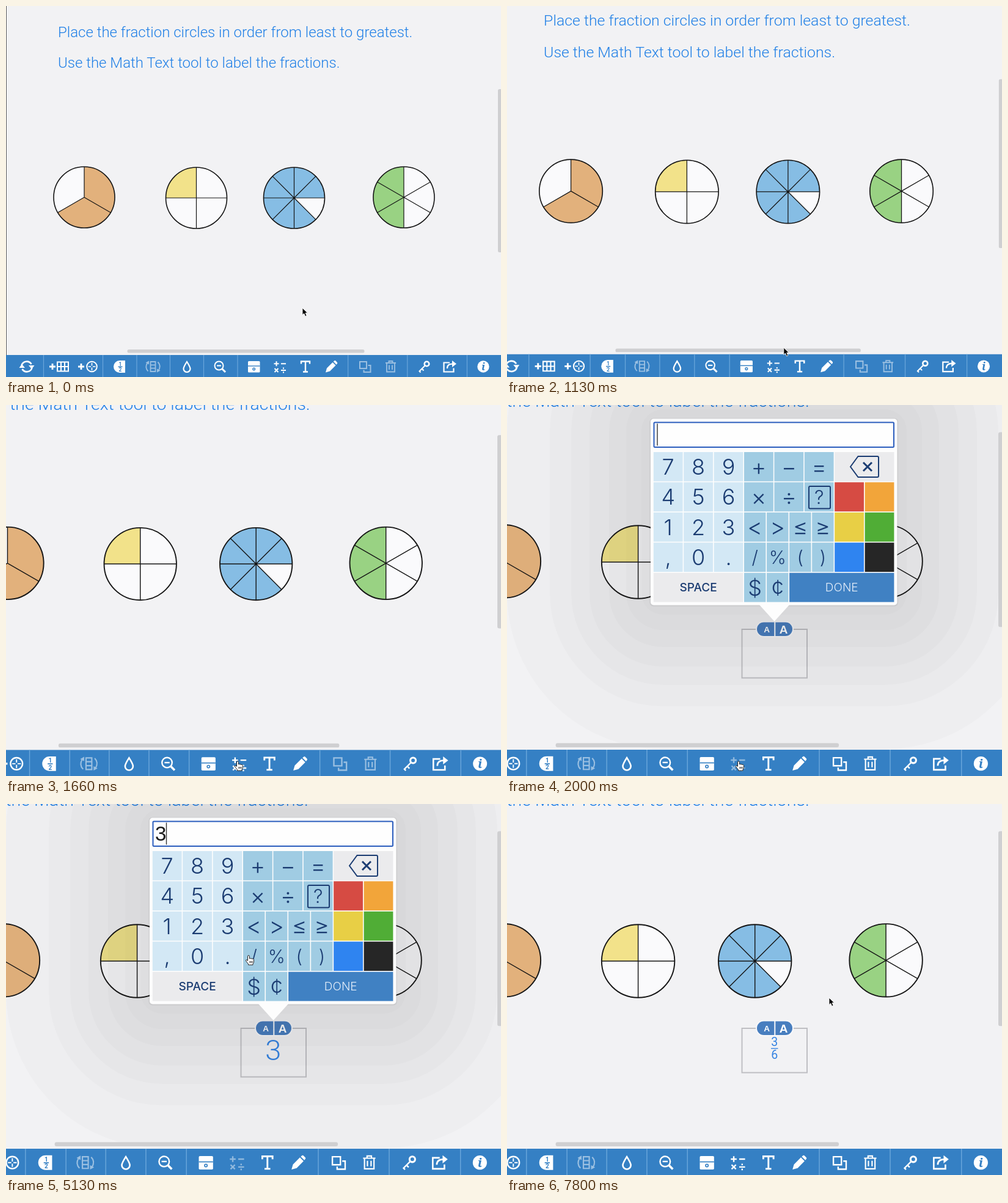
Recreate the animation shown at these times as an HTML page. Size 810 px wide and 607 px high, loop 9400 ms.

```html
<!DOCTYPE html>
<html lang="en">
<head>
<meta charset="utf-8">
<title>Ordering fractions</title>
<style>
  html, body { margin: 0; width: 100%; height: 100%; overflow: hidden; background: #f2f2f4; }
  svg { display: block; width: 100%; height: 100%; cursor: default; }
  .task { font: 300 24px Roboto, sans-serif; fill: #1f7fe6; }
  #bar { fill: none; stroke: #fff; stroke-width: 2; }
  #bar .solid { fill: #fff; stroke: none; }
  #bar .blue { fill: #3580c4; stroke: none; }
  #bar .cut { stroke: #3580c4; stroke-width: 1.4; }
  #bar .dim { opacity: .5; }
  #keys text { font-family: Inter, "Liberation Sans", sans-serif; font-weight: 300; fill: #1b3c72; text-anchor: middle; }
  #keys .word { font-weight: 500; }
  #keys .done { font-weight: 300; fill: #e4eefa; }
  #entry { font: 33px "Liberation Sans", sans-serif; fill: #1c1c1c; }
  #label text { font-family: Roboto, sans-serif; fill: #3583e2; text-anchor: middle; }
  #label .size { font-family: "Liberation Sans", sans-serif; font-weight: bold; fill: #fff; }
</style>
</head>
<body>
<svg viewBox="0 0 810 607">
  <g id="page">
    <rect width="810" height="607" fill="#f2f2f4"/>
    <path d="M.5 0V571" stroke="#5a5a5c"/>
    <text class="task" x="85" y="51">Place the fraction circles in order from least to greatest.</text>
    <text class="task" x="85" y="101">Use the Math Text tool to label the fractions.</text>
    <g id="pies"></g>
  </g>

  <g id="label">
    <rect id="frame" x="384.5" y="367" width="106.5" height="79.5" fill="none" stroke="#bfbfc3" stroke-width="2"/>
    <rect x="407" y="353.5" width="62" height="26.5" rx="13.2" fill="#f8f8fa"/>
    <rect x="409" y="355.5" width="58" height="22.5" rx="11.2" fill="#487ebf"/>
    <path d="M438.3 355v23.5" stroke="#f8f8fa" stroke-width="2"/>
    <text class="size" x="425" y="372" font-size="13.5">A</text>
    <text class="size" x="452.5" y="374" font-size="19">A</text>
    <text id="whole" x="437.2" y="419" font-size="47" font-weight="300">3</text>
    <g id="fraction">
      <text x="437.7" y="396.3" font-size="19.5">3</text>
      <path d="M432 400h11.5" stroke="#3583e2" stroke-width="1.4"/>
      <text id="lower" x="437.7" y="416.6" font-size="19.5">6</text>
    </g>
  </g>

  <g id="popup">
    <g id="shade" fill-opacity=".017"></g>
    <rect x="233.5" y="21.5" width="406.5" height="308" rx="6" fill-opacity=".06"/>
    <path d="M413 327h49l-24.5 27z" fill="#fdfdfd"/>
    <rect x="235" y="22.5" width="403.5" height="305" rx="5" fill="#fdfdfd"/>
    <rect x="240.5" y="28.5" width="392.5" height="40.5" rx="1.5" fill="#fefefe" stroke="#2b5dbd" stroke-width="2"/>
    <text id="entry" x="244" y="60"></text>
    <path id="caret" d="M0 30.5v36" stroke="#333" stroke-width="1.4"/>
    <g id="keys"></g>
    <g fill="none" stroke="#1b3c72" stroke-width="2">
      <path d="M562 101l12.5-17H606q2 0 2 2v30q0 2-2 2H574.5z"/>
      <path d="M583 94l14 14m0-14l-14 14" stroke-width="3"/>
      <rect x="494" y="133" width="35" height="36.5" rx="2"/>
    </g>
  </g>

  <g id="chrome">
    <g fill="#cfcfd1">
      <rect x="198.5" y="562" width="388" height="5.6" rx="2.5"/>
      <rect x="805" y="136" width="9" height="267" rx="2.5"/>
    </g>
    <g id="bar" transform="translate(0 590)">
      <rect class="blue" y="-19" width="811" height="37"/>
      <path stroke="#6aa6db" stroke-width="1.2" d="M61.5-19v36M158.5-19v36M214-19v36M268.5-19v36M323.5-19v36M379-19v36M559.7-19v36M656.8-19v36M754.5-19v36"/>
      <g id="turn">
        <path stroke-width="2.6" d="M25.5-2A8.8 8.8 0 0 1 41.5-4"/>
        <path class="solid" d="M37-2h9.5l-4.5 6z"/>
      </g>
      <use href="#turn" transform="rotate(180 34 0)"/>
      <path stroke-width="2.8" d="M71 0h10M76-5v10M118 0h10M123-5v10"/>
      <path d="M84-7.5h18v15h-18zM90-7v14M96-7v14M84 0h18"/>
      <circle cx="140.5" r="8.3"/>
      <path stroke-width="1.6" d="M134.5 0h4.5m3 0h4.5M140.5-6v4.5m0 3V6"/>
      <path class="solid" d="M195-10h-9a10 10 0 0 0 0 20h9z"/>
      <g class="blue" font-family="Roboto, sans-serif" font-size="8.5" font-weight="bold" text-anchor="middle">
        <text x="187" y="-1.5">1</text>
        <text x="187" y="8.2">2</text>
      </g>
      <path class="cut" d="M183.5 .2h7"/>
      <g class="dim">
        <path stroke-width="1.8" d="M236.5-8h8v16h-8zM236.5-2.7h8m-8 5.4h8M232.5 7.5c-4-4-4-9-1-14M248.5-7.5c4 4 4 9 1 14"/>
        <path class="solid" d="M228.5-6.5l5.5-3v6zM252.5 6.5l-5.5 3v-6z"/>
      </g>
      <path stroke-width="2.2" d="M296-8C292.5-2.5 290.5 1 290.5 3.5a5.5 5.5 0 0 0 11 0C301.5 1 299.500-2.500 296-8z"/>
      <circle cx="348.5" cy="-1.5" r="7"/>
      <path d="M345-1.5h7"/>
      <path stroke-width="3" d="M353.5 3.5l5.5 5.5"/>
      <rect class="solid" x="396" y="-9" width="19.5" height="18.5" rx="1.5"/>
      <path class="cut" d="M396-1h19.5"/>
      <circle class="cut" cx="405.7" cy="4" r="1.8"/>
      <path id="math" d="M438.5-4.8h8M442.5-8.8v8M450-4.800h8M439.5 3l6 6m0-6l-6 6M450 6h8M454 1.5v2.2m0 4.6v2.2"/>
      <path stroke-width="2.4" d="M483-4.5v-4h14v4M490-8.5v17M486 8.5h8"/>
      <path class="solid" d="M523 9.5l2-7L534.5-7l5 5-9.5 9.5zM535.7-8.2l1.8-1.5q1-.6 2 .3l2.3 2.3q.9 1 .3 2l-1.5 1.8z"/>
      <g id="edit">
        <path d="M579-8h11v11h-11zM592.5-2h4v11h-11V5.5"/>
        <path stroke-width="1.8" d="M621-6h17M626.5-6.5v-2.5h6v2.500M623-6V8.5h13V-6M627-2.5v7.5M632-2.5v7.5"/>
      </g>
      <circle cx="688.5" cy="-4.5" r="3.8" stroke-width="2.6"/>
      <path d="M686-2l-9.5 9.5 2 2M680.5 3.5l3 3"/>
      <path stroke-width="2.2" d="M726-6.5h-9.5v15h16v-6M722 3c0-6 4-7.5 9-7.5"/>
      <path class="solid" d="M730-10l7 5.5-7 5.5z"/>
      <circle class="solid" cx="781" r="9.7"/>
      <text class="blue" x="781" y="6" font-family="Noto Serif, serif" font-size="17" font-style="italic" font-weight="bold" text-anchor="middle">i</text>
    </g>
  </g>

  <g id="mouse" stroke-linejoin="round">
    <path id="arrow" d="M0 0V11.500l2.7-2.4 2 4.6 2.3-1-2-4.5H8.6z" stroke="#fff" stroke-width=".9"/>
    <path id="hand" fill="#fff" stroke="#222" d="M-1.5 1.2q0-1.4 1.4-1.4T1.4 1.2V5q1.3-1 2.4 0 1.3-.6 2.3.4 1.7-.5 2.3 1V10q0 2-1.4 3.5v1.7H-.5v-1.5Q-2.5 11.5-4.5 8.5q-.3-1.6 1.3-1.6l1.7 1.5zM2 9v3m2-3v3m2-3v3"/>
  </g>
</svg>

<script>
const LOOP = 9400, ZOOM = 1.1944;
const $ = id => document.getElementById(id);
const add = (id, markup) => $(id).insertAdjacentHTML('beforeend', markup);

function pie(x, y, parts, start, filled, color) {
  const r = 50;
  const rim = i => {
    const a = (start + i * 360 / parts) * Math.PI / 180;
    return `${r * Math.cos(a)} ${r * Math.sin(a)}`;
  };
  let spokes = '';
  for (let i = 0; i < parts; i++) spokes += `M0 0L${rim(i)}`;
  const large = filled * 2 > parts ? 1 : 0;
  add('pies', `<g transform="translate(${x} ${y})" stroke="#151515">
    <circle r="${r}" fill="#fafafc" stroke="none"/>
    <path d="M0 0L${rim(0)}A${r} ${r} 0 ${large} 1 ${rim(filled)}z" fill="${color}" stroke="none"/>
    <path d="${spokes}" stroke-width="1.2"/>
    <circle r="${r}" fill="none" stroke-width="1.6"/></g>`);
}
pie(128, 313, 3, -90, 2, '#e2b17c');
pie(311.5, 314, 4, 180, 1, '#f2e28a');
pie(471.5, 314, 8, 45, 7, '#86bde4');
pie(651, 313, 6, 90, 3, '#99d283');

// Stepped shadow: each band reaches d px beyond the popup
for (const d of [235, 165, 130, 100, 68, 40, 15])
  add('shade', `<rect x="${235 - d}" y="${22 - d}" width="${404 + 2 * d}" height="${306 + 2 * d}" rx="${d + 20}"/>`);

// Keypad: col and span count in cells of 49.4 px
const CELL = 49.4, GAP = 1.6, PALE = '#d3e8f5', MID = '#a0cce3', GREY = '#ebebed';
function key(col, row, span, bg, text = '', size = 36, cls = '') {
  const x = 239.8 + col * CELL, y = 77 + row * CELL, w = span * CELL - GAP;
  const base = y + 24 + size * .36;
  const shown = text.replace('<', '&lt;');
  add('keys', `<rect x="${x}" y="${y}" width="${w}" height="${CELL - GAP}" fill="${bg}"/>
    <text class="${cls}" x="${x + w / 2}" y="${base}" font-size="${size}">${shown}</text>`);
}
['789', '456', '123', ',0.'].forEach((s, row) => [...s].forEach((c, i) => key(i, row, 1, PALE, c)));
['+−=', '×÷?'].forEach((s, row) => [...s].forEach((c, i) => key(3 + i, row, 1, MID, c, c === '?' ? 31 : 38)));
[['<>≤≥', 38], ['/%()', 30], ['$¢', 36]]
  .forEach(([s, size], row) => [...s].forEach((c, i) => key(3 + i * .75, row + 2, .75, MID, c, size)));
[['#d64b43', '#f2a53a'], ['#e8cf45', '#50ad36'], ['#2f84f0', '#262626']]
  .forEach((pair, row) => pair.forEach((c, i) => key(6 + i, row + 1, 1, c)));
key(6, 0, 2, GREY);
key(0, 4, 3, GREY, 'SPACE', 19, 'word');
key(4.5, 4, 3.5, '#4081c3', 'DONE', 19, 'done');

// Pointer tip: time, x, y
const PATH = [
  [0, 485, 494], [860, 485, 494], [1130, 453, 559], [1500, 379, 583], [3500, 379, 583],
  [3860, 361, 372], [4300, 362, 198], [4660, 362, 198], [5130, 397, 248], [5330, 403, 246],
  [5460, 403, 246], [5930, 362, 146], [6290, 362, 146], [6660, 490, 245], [7240, 528, 289],
  [7350, 528, 289], [7700, 527, 317], [LOOP, 527, 317]
];
// Typing: time, text, caret x
const TYPED = [[1800, '', 246], [4660, '3', 262.5], [5460, '3/', 271.7], [6060, '3/6', 291]];

const clamp = v => Math.min(1, Math.max(0, v));
const ramp = (t, from, to) => clamp((t - from) / (to - from));
const show = (id, on) => $(id).setAttribute('visibility', on ? 'inherit' : 'hidden');

function pointerAt(t) {
  const i = PATH.findIndex(p => p[0] > t), [t0, x0, y0] = PATH[i - 1], [t1, x1, y1] = PATH[i];
  const k = (t - t0) / (t1 - t0);
  return [x0 + (x1 - x0) * k, y0 + (y1 - y0) * k];
}

function draw(t) {
  const zoom = 1 + (ZOOM - 1) * (1 - Math.cos(Math.PI * ramp(t, 877, 1797))) / 2;
  const view = `translate(810 607) scale(${zoom}) translate(-810 -607)`;
  $('page').setAttribute('transform', view);
  $('chrome').setAttribute('transform', view);

  const opened = ramp(t, 1800, 2000), popup = opened - ramp(t, 7290, 7600);
  $('popup').setAttribute('opacity', popup);
  $('label').setAttribute('opacity', opened);
  $('math').setAttribute('opacity', 1 - .55 * popup);
  $('edit').setAttribute('opacity', .5 + .5 * opened);

  const [since, text, caretX] = TYPED.filter(e => e[0] <= t).pop() || TYPED[0];
  const blinkFrom = text ? since : 2000;
  $('entry').textContent = text;
  $('caret').setAttribute('transform', `translate(${caretX})`);
  show('caret', Math.floor(Math.max(0, t - blinkFrom) / 500) % 2 === 0);
  show('whole', text === '3');
  show('fraction', text.length > 1);
  show('lower', text.length > 2);
  $('frame').setAttribute('height', text.length > 1 ? 72.5 : 79.5);

  const [x, y] = pointerAt(t);
  const hand = y > 564 || (t > 2000 && t < 7350 && y < 322);
  $('mouse').setAttribute('transform', `translate(${x} ${y})`);
  show('hand', hand);
  show('arrow', !hand);
}

function tick() {
  draw(performance.now() % LOOP);
  requestAnimationFrame(tick);
}
tick();
</script>
</body>
</html>
```
